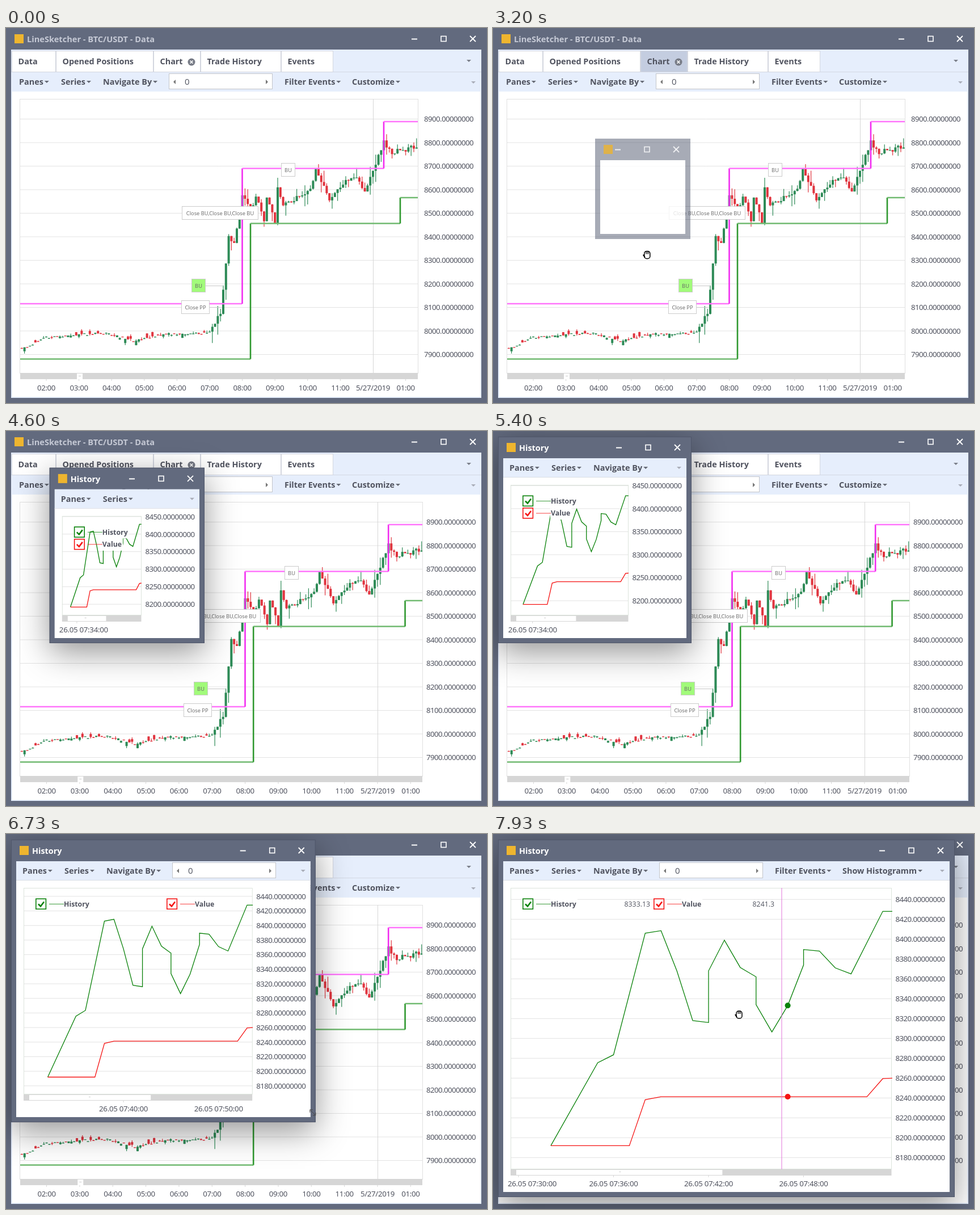
An HTML page with a canvas for the animation above (8 s loop, 848x661 px).

```html
<!DOCTYPE html>
<html lang="en">
<head>
<meta charset="utf-8">
<title>Chart windows</title>
<style>
html, body { margin: 0; width: 100%; height: 100%; overflow: hidden; background: #626a7e; }
canvas { display: block; }
</style>
</head>
<body>
<canvas id="stage" width="848" height="661"></canvas>
<script>
const ctx = document.getElementById('stage').getContext('2d');
const LOOP = 8000;
const FRAME = '#626a7e', BAR = '#e6eefc', INK = '#50535f', GRID = '#e3e3e3', TRACK = '#d6d6d6';
const GREEN = '#0a820a', RED = '#f51414';
const BOLD = 'bold 14.4px "Open Sans", sans-serif';
const TITLE = 'bold 14.6px "Open Sans", sans-serif';
const LEGEND = 'bold 12.3px "Open Sans", sans-serif';
const AXIS = '13.3px "Noto Sans", sans-serif';
const TAG = '9.3px "Open Sans", sans-serif';

// Turning points of the candle trend: [candle, height].
const trend = [[0, 566], [9, 545], [19, 541], [31, 538], [41, 551], [52, 540], [69, 537], [73, 503], [76, 368],
  [78, 378], [81, 296], [84, 318], [86, 298], [89, 340], [90, 299], [93, 341], [94, 285], [96, 314], [106, 285],
  [108, 248], [113, 303], [118, 274], [123, 264], [126, 291], [133, 200], [136, 220], [145, 208]];

// Turning points of the two curves: [minute after 07:30, price].
const history = [[2.04, 8192], [5, 8275.5], [6, 8283.5], [8, 8406], [9, 8408.5], [10, 8368], [11, 8318],
  [12, 8316], [12, 8368], [13, 8399], [14, 8371.5], [15, 8362], [15, 8334], [16, 8306.5], [17, 8333.13],
  [18, 8374], [18, 8389.5], [19, 8388], [20, 8371], [21, 8365], [23, 8428], [23.6, 8428]];
const value = [[2.04, 8192], [7, 8192], [8, 8238.3], [9, 8241.3], [22, 8241.3], [23, 8259.5], [23.6, 8260]];

const noise = n => { const s = Math.sin(n * 127.1) * 43758.5; return s - Math.floor(s); };

// Linear interpolation through keys of the form [position, ...values].
function along(t, keys) {
  const next = keys.findIndex(key => key[0] >= t);
  if (next < 1) return keys.at(next).slice(1);
  const p = keys[next - 1], q = keys[next], k = (t - p[0]) / (q[0] - p[0]);
  return p.slice(1).map((v, i) => v + (q[i + 1] - v) * k);
}

function box(x, y, w, h, fill, stroke) {
  if (fill) { ctx.fillStyle = fill; ctx.fillRect(x, y, w, h); }
  if (stroke) { ctx.strokeStyle = stroke; ctx.lineWidth = 1; ctx.strokeRect(x + .5, y + .5, w - 1, h - 1); }
}

function line(points, color, width = 1) {
  ctx.beginPath();
  points.forEach(([x, y]) => ctx.lineTo(x, y));
  ctx.strokeStyle = color;
  ctx.lineWidth = width;
  ctx.stroke();
}

function triangle(points, fill) {
  ctx.beginPath();
  points.forEach(([x, y]) => ctx.lineTo(x, y));
  ctx.fillStyle = fill;
  ctx.fill();
}

function disc(x, y, r, fill) {
  ctx.beginPath();
  ctx.arc(x, y, r, 0, 7);
  ctx.fillStyle = fill;
  ctx.fill();
}

function cross(x, y, r, width) {
  line([[x - r, y - r], [x + r, y + r]], '#fff', width);
  line([[x - r, y + r], [x + r, y - r]], '#fff', width);
}

// Draws text around a vertical centre and returns its width.
function text(str, x, y, font, color = INK, align = 'left', spacing = 0) {
  ctx.font = font;
  ctx.letterSpacing = spacing + 'px';
  ctx.textAlign = align;
  ctx.fillStyle = color;
  ctx.fillText(str, x, y + parseFloat(font.match(/[\d.]+(?=px)/)) * .36);
  const width = ctx.measureText(str).width;
  ctx.letterSpacing = '0px';
  return width;
}

const price = (p, x, y) => text(p.toFixed(8), x, y, AXIS, INK, 'left', -.6);
const dropArrow = (x, y, color = '#666a75') => triangle([[x - 4, y - 2], [x + 4, y - 2], [x, y + 2]], color);

function titleBar(x, y, w) {
  const right = x + w, mid = y + 19;
  box(x + 15, y + 11, 16, 16, '#eeb52f');
  line([[right - 133, mid + .5], [right - 123, mid + .5]], '#fff', 2);
  ctx.lineWidth = 1.6;
  ctx.strokeRect(right - 81, mid - 4.5, 9, 9);
  cross(right - 25, mid, 5, 1.8);
}

function toolbar(x, y, w, lastItem, lastEnd) {
  const fits = end => end < w - 30;
  const menu = (label, at, end) => {
    if (fits(end)) dropArrow(x + at + text(label, x + at, y, BOLD) + 6, y);
  };
  menu('Panes', 20, 72);
  menu('Series', 94, 146);
  menu('Navigate By', 168, 264);
  if (fits(467)) {
    box(x + 284, y - 15, 183, 28, '#fff', '#c3c5ca');
    for (const [tip, side] of [[292, 4], [459, -4]])
      triangle([[x + tip + side, y - 4], [x + tip + side, y + 4], [x + tip, y]], '#777');
    text('0', x + 312, y, '15px "Open Sans", sans-serif');
  }
  menu('Filter Events', 488, 585);
  menu(lastItem, 607, lastEnd);
}

function tabs(hover) {
  box(9, 38, 829, 74, BAR);
  box(9, 77, 829, 1, '#d3d8e4');
  let left = 11;
  for (const [label, width] of [['Data', 76], ['Opened Positions', 170], ['Chart', 81], ['Trade History', 140],
    ['Events', 90]]) {
    box(left - 1, 40, width + 2, 38, '#d3d6df');
    box(left, 41, width, 36, hover && label === 'Chart' ? '#c4cde0' : '#fff');
    text(label, left + 10.5, 59, BOLD);
    left += width + 2;
  }
  disc(327, 60, 6.5, '#777b86');
  cross(327, 60, 2.5, 1.6);
  dropArrow(816, 58, '#7b7f8a');
  toolbar(3, 95, 848, 'Customize', 690);
  dropArrow(824, 96, '#a9adb8');
}

function steps(points, flat, rise) {
  for (let i = 1; i < points.length; i++) {
    const vertical = points[i][0] === points[i - 1][0];
    line([points[i - 1], points[i]], vertical ? rise : flat, 2.6);
  }
}

function candles(mapX, scale) {
  const close = i => along(i, trend)[0] + (noise(i) - .5) * (i < 70 ? 4 : 9);
  for (let i = 0; i < 146; i++) {
    const calm = i < 70, to = close(i);
    const from = calm ? to + (noise(i + 200) - .5) ** 3 * 64 : close(i - 1);
    const top = Math.min(from, to), low = Math.max(from, to), x = mapX(27.8 + 4.8 * i);
    const color = to > from ? '#e0353f' : '#2e8b57';
    const wick = n => (calm ? 4 : 20) * noise(i + n) ** 3;
    box(x - 2 * scale, top, 4 * scale, Math.max(1.3, low - top), color);
    line([[x, top - wick(300)], [x, low + wick(600)]], color, 1.2);
  }
}

function mainChart(wide, crossX) {
  const scale = wide ? 1.0128 : 1, right = wide ? 734 : 726;
  const mapX = x => 25 + (x - 25) * scale;
  box(9, 111, 829, 541, BAR);
  box(11, 112, 825, 538, '#fff');
  for (let i = 0; i <= 10; i++) {
    const y = 160.5 + 41.5 * i;
    line([[25, y], [right, y]], GRID);
    price(8900 - 100 * i, right + (wide ? 7 : 11), y);
  }
  box(24, 125, right - 23, 484, null, '#e0e0e0');
  box(25, 608, right - 25, 11, TRACK);
  box(mapX(125), 609, 10, 10, '#fff');
  box(mapX(128), 613, 4, 1, '#ccc');
  for (let i = 0; i < 12; i++) {
    const x = mapX(71 + 57.6 * i);
    const label = i === 10 ? '5/27/2019' : String((i + 1) % 11 + 1).padStart(2, '0') + ':00';
    text(i === 11 ? '01:00' : label, x, 634, AXIS, INK, 'center', -.35);
    line([[x, 619], [x, 622]], '#d5d5d5');
  }
  const midnight = Math.round(mapX(647)) + .5;
  ctx.save();
  ctx.beginPath();
  ctx.rect(25, 125, right - 25, 484);
  ctx.clip();
  line([[midnight, 125], [midnight, 608]], '#d6d6d6');
  candles(mapX, scale);
  const place = ([x, y]) => [mapX(x), y];
  steps([[25, 486], [416.5, 486], [416.5, 247.5], [666, 247.5], [666, 165], [740, 165]].map(place),
    '#ff74fb', '#f22cf0');
  steps([[25, 583.5], [431, 583.5], [431, 344.5], [695, 344.5], [695, 299], [740, 299]].map(place),
    '#70ba70', '#2f982f');
  ctx.restore();
  line([[mapX(352), 454.5], [mapX(383), 454.5]], '#c8c8c8');
  line([[mapX(359), 492.5], [mapX(379), 492.5]], '#c8c8c8');
  const tag = (label, x, y, w, fill = '#fff') => {
    x = Math.round(mapX(x));
    box(x, y, w, 24, fill, '#cbcbcb');
    text(label, x + w / 2, y + 12.3, TAG, '#666', 'center');
  };
  tag('BU', 485, 238, 25);
  tag('Close BU,Close BU,Close BU', 310, 314, 135);
  tag('BU', 327, 442, 25, '#a2fb7b');
  tag('Close PP', 309, 480, 50);
  if (crossX) line([[crossX, 125], [crossX, 608]], '#e274da');
}

function legend(x, y, label, color, amount, amountX) {
  ctx.font = LEGEND;
  box(x + 49, y - 11, ctx.measureText(label).width + 3, 22, '#fff');
  box(x, y - 10, 20, 20, '#fff');
  ctx.strokeStyle = color;
  ctx.lineWidth = 1.6;
  ctx.strokeRect(x + .8, y - 9.2, 17.6, 18);
  line([[x + 5, y], [x + 9, y + 4], [x + 15, y - 4]], color, 2.6);
  line([[x + 24, y], [x + 50, y]], color, .8);
  text(label, x + 50, y, LEGEND);
  if (amount) text(+amount.toFixed(2), amountX, y + .5, '500 12.3px "Open Sans", sans-serif', INK, 'right');
}

function historyChart(x, y, w, h, crossX) {
  const left = x + 22, top = y + 85, right = x + w - 111.5, bottom = y + h - 49;
  const perMinute = (right - left) / 24.05;
  const px = m => left + (m + .5) * perMinute;
  const py = p => top + (8451.6 - p) / 283.4 * (bottom - top);
  const step = h < 450 ? 50 : 20;
  for (let p = step === 50 ? 8200 : 8180; p <= 8450; p += step) {
    line([[left, py(p)], [right, py(p)]], GRID);
    price(p, right + 7, py(p));
  }
  box(left, top, right - left + .5, bottom - top, null, '#dce4dc');
  box(left, bottom, right - left, 11, TRACK);
  box(left + 10, bottom + 1, (right - left) * .556 - 10, 9, '#fff');
  box(left + (right - left) * .285, bottom + 4, 3, 1, '#ccc');
  const [first, every] = perMinute > 19 ? [0, 6] : perMinute > 9.8 ? [10, 10] : [4, 20];
  for (let m = first; m < 23; m += every) {
    text(`26.05 07:${30 + m}:00`, Math.max(x + 60, px(m)), bottom + 25, AXIS, INK, 'center', -.3);
    line([[px(m), bottom + 11], [px(m), bottom + 14]], '#d5d5d5');
  }
  const curve = (data, color) => line(data.map(([m, p]) => [px(m), py(p)]), color, 1.3);
  curve(history, GREEN);
  curve(value, RED);

  const nearest = Math.round((crossX - left) / perMinute - .5);
  const [amountA, amountB] = crossX ? [along(nearest, history)[0], along(nearest, value)[0]] : [];
  const wide = w > 500;
  legend(x + 43, y + 113.5, 'History', GREEN, amountA, x + 268);
  legend(x + (wide ? 274 : 43), y + (wide ? 113.5 : 135), 'Value', RED, amountB, x + 487);
  if (crossX) {
    line([[crossX, top], [crossX, bottom]], '#e274da');
    disc(px(nearest), py(amountA), 5, GREEN);
    disc(px(nearest), py(amountB), 5, RED);
  }
}

function dropShadow(x, y, w, h) {
  ctx.save();
  ctx.beginPath();
  ctx.rect(0, 0, 848, 661);
  ctx.rect(x, y, w, h);
  ctx.clip('evenodd');
  ctx.shadowColor = 'rgba(0,0,0,.42)';
  ctx.shadowBlur = 54;
  ctx.shadowOffsetY = 16;
  box(x, y, w, h, '#000');
  ctx.restore();
}

// The frame may be smaller than the content while a resize catches up.
function floatingWindow(x, y, w, h, frameW, frameH, ghost, crossX) {
  ctx.save();
  if (ghost) ctx.globalAlpha = .56;
  else {
    dropShadow(x, y, w, h);
    box(x, y, w, h, 'rgba(98,106,126,.05)', 'rgba(50,55,70,.4)');
  }
  ctx.beginPath();
  ctx.rect(x, y, frameW, frameH);
  ctx.rect(x + 9, y + 38, frameW - 18, frameH - 47);
  ctx.fillStyle = FRAME;
  ctx.fill('evenodd');
  if (!ghost) box(x, y, frameW, frameH, null, '#4f566a');
  else ctx.globalAlpha = .8;
  titleBar(x, y, frameW);
  if (w < 220) box(x + 9, y + 38, w - 18, h - 47, '#fff');
  else {
    text('History', x + 37, y + 20, BOLD, '#fff');
    box(x + 9, y + 38, frameW - 18, 34, BAR);
    box(x + 9, y + 71, w - 18, h - 80, '#fff');
    box(x + 9, y + 71, frameW - 18, 1, '#d9dde6');
    toolbar(x, y + 55, frameW, 'Show Histogramm', 750);
    dropArrow(x + frameW - 22, y + 55, '#a9adb8');
    historyChart(x, y, w, h, crossX);
  }
  ctx.restore();
}

function handCursor(x, y) {
  ctx.beginPath();
  ctx.roundRect(x - 4, y - 6, 10, 13, 4);
  ctx.fillStyle = '#fff';
  ctx.fill();
  ctx.strokeStyle = '#000';
  ctx.lineWidth = 1.5;
  ctx.stroke();
  for (const dx of [-1, 1.2, 3.4]) line([[x + dx, y - 6], [x + dx, y - 1]], '#000', 1.1);
  line([[x - 6, y], [x - 3, y + 5]], '#000', 2);
}

function resizeCursor(x, y) {
  line([[x - 4, y - 4], [x + 4, y + 4]], '#444');
  for (const s of [-5, 5]) line([[x + s, y], [x + s, y + s], [x, y + s]], '#444');
}

function draw(t) {
  box(0, 0, 848, 661, FRAME);
  titleBar(0, 0, 848);
  text('LineSketcher - BTC/USDT - Data', 37, 20, TITLE, '#c6cad6');
  tabs(t >= 1470 && t < 3600);
  mainChart(t >= 3670, t >= 600 && t < 1330 && (t < 1070 ? 343.5 : 338.5));

  const [px, py] = along(t, [[530, 335, 140], [1000, 270, 397], [3670, 271, 400], [6330, 352, 376],
    [6470, 419, 427], [7070, 699, 574], [7400, 805, 632], [7930, 433, 318]]);

  if (t >= 2800) {
    const ghost = t < 3670, lagging = t >= 6330 && t < 6560;
    const [x, y] = along(t, ghost
      ? [[2800, 215, 140], [3130, 180, 195]]
      : [[4330, 180, 195], [4600, 77, 65], [5000, 9, 10]]);
    const [right, bottom] = ghost ? [x + 168, y + 177] : along(t, [[4330, 348, 372], [4600, 350, 374],
      [6330, 350, 374], [6470, 390, 408], [7070, 748, 638], [7200, 750, 638], [7500, 814, 640]]);
    const w = right - x, h = bottom - y;
    const crossX = t >= 7600 ? Math.floor(px) + 76 : 0;
    floatingWindow(x, y, w, h, lagging ? 341 : w, lagging ? 364 : h, ghost, crossX);
  }

  if (t >= 530 && t < 3670 || t >= 7500) handCursor(px, py);
  else if (t >= 6130) resizeCursor(px, py);
}

const start = performance.now();
function tick() {
  draw((performance.now() - start) % LOOP);
  requestAnimationFrame(tick);
}
tick();
</script>
</body>
</html>
```
